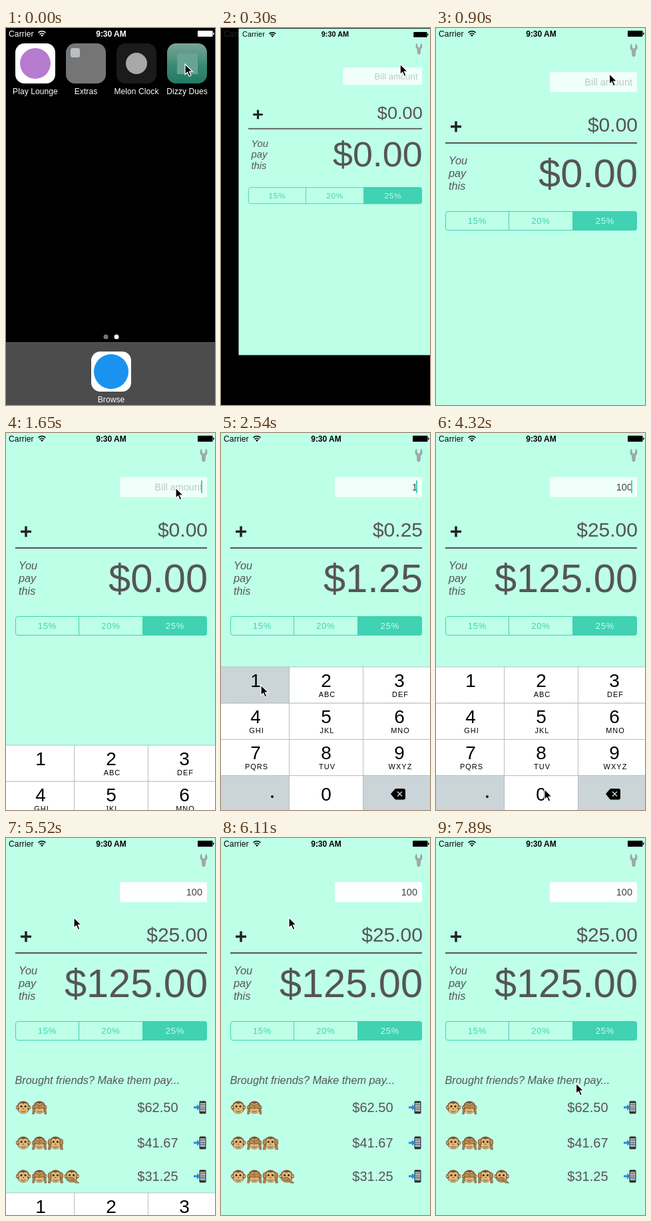
An HTML page for the animation above (8000 ms loop, 314 by 564 pixels).

```html
<!DOCTYPE html>
<html lang="en">
<head>
<meta charset="utf-8">
<title>Tip calculator</title>
<style>
  html, body { margin: 0; height: 100%; overflow: hidden; background: #000; }
  svg { display: block; width: 100vw; height: 100vh; }
  text { font-family: 'Liberation Sans', Arial, sans-serif; }
  .mid { text-anchor: middle; }
  .end { text-anchor: end; }
  .status { font-size: 12px; }
  .label { font-size: 12px; letter-spacing: .1px; fill: #fff; text-anchor: middle; }
  .dark { fill: #555; }
  .aside { font-style: italic; font-size: 16.3px; fill: #555; }
  .seg { font-size: 13px; letter-spacing: .8px; text-anchor: middle; }
  .digit { font-size: 28px; text-anchor: middle; }
  .letters { font-size: 11px; letter-spacing: 1px; text-anchor: middle; }
</style>
</head>
<body>
<svg viewBox="0 0 314 564">
  <defs>
    <linearGradient id="leaf" x2="0" y2="1">
      <stop stop-color="#7aa596"/><stop offset=".55" stop-color="#3a8a75"/><stop offset="1" stop-color="#1f7a64"/>
    </linearGradient>
    <g id="status">
      <text class="status" x="4" y="12.5" letter-spacing=".15">Carrier</text>
      <text class="status mid" x="158" y="12.5" font-weight="bold">9:30 AM</text>
      <path d="M48.5 7a8 8 0 0 1 11 0M50.6 9.3a5 5 0 0 1 6.800 0" fill="none" stroke="currentColor" stroke-width="1.6"/>
      <path d="M54 13l-2-2.200a3 3 0 0 1 4 0z"/>
      <rect x="288" y="4" width="22.500" height="9" rx="1"/>
      <rect x="311" y="6.700" width="1.500" height="3.600" rx=".7"/>
    </g>
    <g id="monkey">
      <g fill="#7a5330"><circle cx="-8.300" r="2.900"/><circle cx="8.300" r="2.900"/><circle r="9.400"/></g>
      <g fill="#dfb878"><circle cx="-8.900" r="1.600"/><circle cx="8.900" r="1.600"/>
        <circle cx="-3.100" cy="-2" r="4.200"/><circle cx="3.100" cy="-2" r="4.200"/><ellipse cy="4" rx="7.200" ry="4.800"/></g>
      <path d="M-3.500 5.500q3.500 2.500 7 0" fill="none" stroke="#7a4a30"/>
      <g fill="#332219"><circle cx="-3" cy="-1.500" r="1.500"/><circle cx="3" cy="-1.500" r="1.500"/><ellipse cy="2" rx="1.200" ry=".6"/></g>
    </g>
    <g id="send">
      <rect x="-1" y="-9.500" width="10" height="19" rx="1.600" fill="#2c2d31"/>
      <rect x="0" y="-7" width="8" height="13.500" fill="#5d7284"/>
      <path d="M.5-5.500h7.500M.5 1h7.500" stroke="#e3b98c" stroke-width="2" stroke-dasharray="1.900 .7"/>
      <path d="M.5-2.300h7.500M.5 4.500h7.500" stroke="#d5e6ee" stroke-width="2" stroke-dasharray="1.900 .7"/>
      <path d="M-9.500-1.500h5v-3l5.500 4.500-5.500 4.500v-3h-5z" fill="#2f86dd"/>
    </g>
  </defs>

  <g id="home">
    <g id="tiles"></g>
    <rect x="-10" y="470" width="334" height="100" fill="#4c4c4c"/>
    <path d="M0 470.500h314" stroke="#5a5a5a"/>
    <circle cx="150" cy="462" r="3.500" fill="#777"/><circle cx="166" cy="462" r="3.500" fill="#fff"/>
    <g id="dock"></g>
  </g>
  <use id="homeStatus" href="#status" fill="#fff" color="#fff"/>

  <g id="app">
    <rect x="-2" y="-2" width="320" height="568" fill="#beffe8"/>
    <use href="#status" color="#000"/>
    <path d="M293.500 24q-3.500 6 1 10l.5 7.500q2 2.500 4 0l.5-7.500q4.500-4 1-10l-1 6-2.500 1.500-2.500-1.500z" fill="#a3aaa8" stroke="#8b9692" stroke-width=".8"/>
    <rect id="field" x="171" y="66" width="131" height="30" rx="2.500" fill="#fff"/>
    <text id="bill" class="end" x="295" y="86" font-size="14.500"></text>
    <rect id="caret" x="293" y="71" width="2" height="19" fill="#40d2b2"/>
    <path d="M22 147.500h16M30 139.500v16" stroke="#222" stroke-width="3.500"/>
    <text id="tip" class="end dark" x="303" y="155" font-size="30"></text>
    <path d="M14 172h288" stroke="#555" stroke-width="2"/>
    <g class="aside"><text x="19" y="204">You</text><text x="19" y="223">pay</text><text x="19" y="242">this</text></g>
    <text id="total" class="end dark" x="303" y="238" font-size="59.500"></text>
    <rect x="14.500" y="274.500" width="287" height="28" rx="3.500" fill="none" stroke="#40d2b2"/>
    <path d="M109.500 274v29M205.500 274.500h93q3 0 3 3v22q0 3-3 3h-93z" fill="#40d2b2" stroke="#40d2b2"/>
    <g class="seg" fill="#40d2b2"><text x="62" y="293">15%</text><text x="157.500" y="293">20%</text><text x="254" y="293" fill="#c8fff0">25%</text></g>
    <g id="friends"><text class="aside" x="13.500" y="368">Brought friends? Make them pay...</text></g>
    <g id="keyboard"></g>
  </g>

  <path id="cursor" d="M0 0v15.500l3.600-3.300 2.600 6 2.700-1.200-2.600-5.800h4.900z" stroke="#fff" stroke-width="1.200"/>
</svg>
<script>
const $ = id => document.getElementById(id);
const LOOP = 8000, STEP = 148.8;
const money = v => '$' + v.toFixed(2);

// Home screen
const tile = (x, y, fill, mark, name) =>
  `<rect x="${x}" y="${y}" width="60" height="60" rx="13.500" fill="${fill}"/>${mark}
   <text class="label" x="${x + 30}" y="${y + 76}">${name}</text>`;
$('tiles').innerHTML =
  tile(14, 23, '#fff', '<circle cx="44" cy="53" r="23" fill="#b77bd0"/>', 'Play Lounge') +
  tile(90, 23, '#757575', '<rect x="97" y="30" width="14" height="14" rx="3" fill="#b9bec2"/>', 'Extras') +
  tile(166, 23, '#1b1b1b', '<circle cx="196" cy="53" r="16" fill="#a8a8a8"/>', 'Melon Clock') +
  tile(242, 23, 'url(#leaf)', '<rect x="257" y="38" width="31" height="31" fill="#68a393"/>', 'Dizzy Dues');
$('dock').innerHTML = tile(128, 484, '#fff', '<circle cx="158" cy="514" r="26" fill="#1a93f0"/>', 'Browse');

// Friends: each monkey in the row covers something else
const hands = [
  '',
  '<ellipse cx="-4" cy="-1.500" rx="4.300" ry="2.900"/><ellipse cx="4" cy="-1.500" rx="4.300" ry="2.900"/><path d="M-10.500 10l1-9 2.500 1-1 8zM10.500 10l-1-9-2.500 1 1 8z"/>',
  '<ellipse cx="-8.700" cy="-1" rx="2.500" ry="4.500"/><ellipse cx="8.700" cy="-1" rx="2.500" ry="4.500"/><path d="M-11 10l1-7h2.500v7zM11 10l-1-7h-2.500v7z"/>',
  '<ellipse cx="-1" cy="4.500" rx="5" ry="2.600"/><path d="M11 10l-7-6-3 2.500 5 3.500z"/>'
];
const monkey = (i, y) => `<g transform="translate(${26 + 24.2 * i} ${y})">
  <use href="#monkey"/><g fill="#b98a52" stroke="#6b4526" stroke-width=".7">${hands[i]}</g></g>`;
$('friends').innerHTML += [403, 456, 506].map((y, row) =>
  hands.slice(0, row + 2).map((_, i) => monkey(i, y)).join('') +
  `<text class="end dark" x="258.500" y="${y + 7}" font-size="20">${money(125 / (row + 2))}</text>
   <use href="#send" x="291.500" y="${y}"/>`).join('');

// Keypad
const cols = [-3, 102.5, 213.5, 321], centers = [52, 158, 268], rowY = r => 350 + 54.2 * r;
const letters = ['', 'ABC', 'DEF', 'GHI', 'JKL', 'MNO', 'PQRS', 'TUV', 'WXYZ'];
const PRESSED = '#cad4d9';
const key = (label, sub, r, c) => {
  const blank = label === '' || label === '.';
  return `<rect id="key${label}" x="${cols[c]}" y="${rowY(r)}" width="${cols[c + 1] - cols[c]}" height="54.200"
      fill="${blank ? PRESSED : '#fff'}" stroke="#b4bbbf" stroke-width=".9"/>` +
    (blank ? '' : `<text class="digit" x="${centers[c]}" y="${rowY(r) + (r < 3 ? 30 : 37)}">${label}</text>`) +
    `<text class="letters" x="${centers[c] + 1.5}" y="${rowY(r) + 45}">${sub}</text>`;
};
$('keyboard').innerHTML =
  letters.map((sub, i) => key(i + 1, sub, Math.floor(i / 3), i % 3)).join('') +
  key('.', '', 3, 0) + key(0, '', 3, 1) + key('', '', 3, 2) +
  `<circle cx="77" cy="544" r="1.900"/>
   <path d="M255 540l6-7q1-1 2-1h11q3 0 3 3v10.500q0 3-3 3h-11q-1 0-2-1z"/>
   <path d="M265 536.500l7 7m0-7l-7 7" stroke="#cad4d9" stroke-width="1.500"/>`;

// Motion, timed in steps
const opening = [[1, 133, 13, .54, .5], [2, 28.3, 2.6, .906, .86], [3, 3, 0, .99, .985], [4, 0, 0, 1, 1]];
const path = [
  [1, 269, 54], [4, 269.5, 54], [7, 256, 76], [8, 255, 82], [12, 255, 82], [14, 150, 240], [16, 60, 377],
  [18, 60, 377], [19, 85, 430], [21, 163, 533], [29, 163, 533], [31, 125, 350], [33, 95, 150],
  [34, 102, 119], [41, 102, 119], [43, 140, 90], [44, 195, 79], [45, 250, 88], [46, 254, 180],
  [48, 255, 389], [49, 268, 412], [50, 270, 413], [51, 250, 398], [53, 210.5, 367]
];
const typed = [[17, '1'], [23, '10'], [26, '100']];
const presses = { 1: [16, 17], 0: [22, 25] };

function along(keys, n) {
  const i = keys.findIndex(k => k[0] >= n);
  if (i <= 0) return (i ? keys[keys.length - 1] : keys[0]).slice(1);
  const a = keys[i - 1], b = keys[i], p = (n - a[0]) / (b[0] - a[0]);
  return a.slice(1).map((v, j) => v + (b[j + 1] - v) * p);
}
function spring(n) {
  const x = Math.max(0, 2.2 * n);
  return 1 - (1 + x) * Math.exp(-x);
}

function draw(n) {
  const zoom = n === 1 ? 2.9 : 1;
  $('home').setAttribute('transform', `translate(272 53) scale(${zoom}) translate(-272 -53)`);
  $('home').setAttribute('opacity', [1, .4][n] || 0);
  $('homeStatus').setAttribute('opacity', [1, .5, .13][n] || 0);

  const [x, y, sx, sy] = along(opening, n);
  $('app').setAttribute('transform', `translate(${x} ${y}) scale(${sx} ${sy})`);
  $('app').setAttribute('opacity', [0, .8][n] ?? 1);

  const last = typed.filter(k => k[0] <= n).pop();
  const text = last ? last[1] : '', amount = Number(text);
  $('bill').textContent = text || 'Bill amount';
  $('bill').setAttribute('fill', text ? '#444' : '#b9c9c5');
  $('tip').textContent = money(amount * .25);
  $('total').textContent = money(amount * 1.25);
  $('friends').setAttribute('opacity', amount ? 1 : 0);

  const editing = n >= 9 && n < 36;
  $('caret').setAttribute('opacity', editing && (n - (last ? last[0] : 9)) % 7 < 4 ? 1 : 0);
  $('field').setAttribute('fill-opacity', n < 36 ? .78 : .97);
  const shown = spring(n - 10.3) - spring(n - 35.5);
  $('keyboard').setAttribute('transform', `translate(0 ${(215 * (1 - shown)).toFixed(2)})`);
  $('keyboard').setAttribute('visibility', shown > 0 ? 'visible' : 'hidden');
  for (const k in presses) $('key' + k).setAttribute('fill', presses[k].includes(n) ? PRESSED : '#fff');

  $('cursor').setAttribute('transform', `translate(${along(path, n)})`);
}

function tick(now) {
  draw(Math.floor(now % LOOP / STEP));
  requestAnimationFrame(tick);
}
draw(0);
requestAnimationFrame(() => tick(performance.now()));
</script>
</body>
</html>
```
